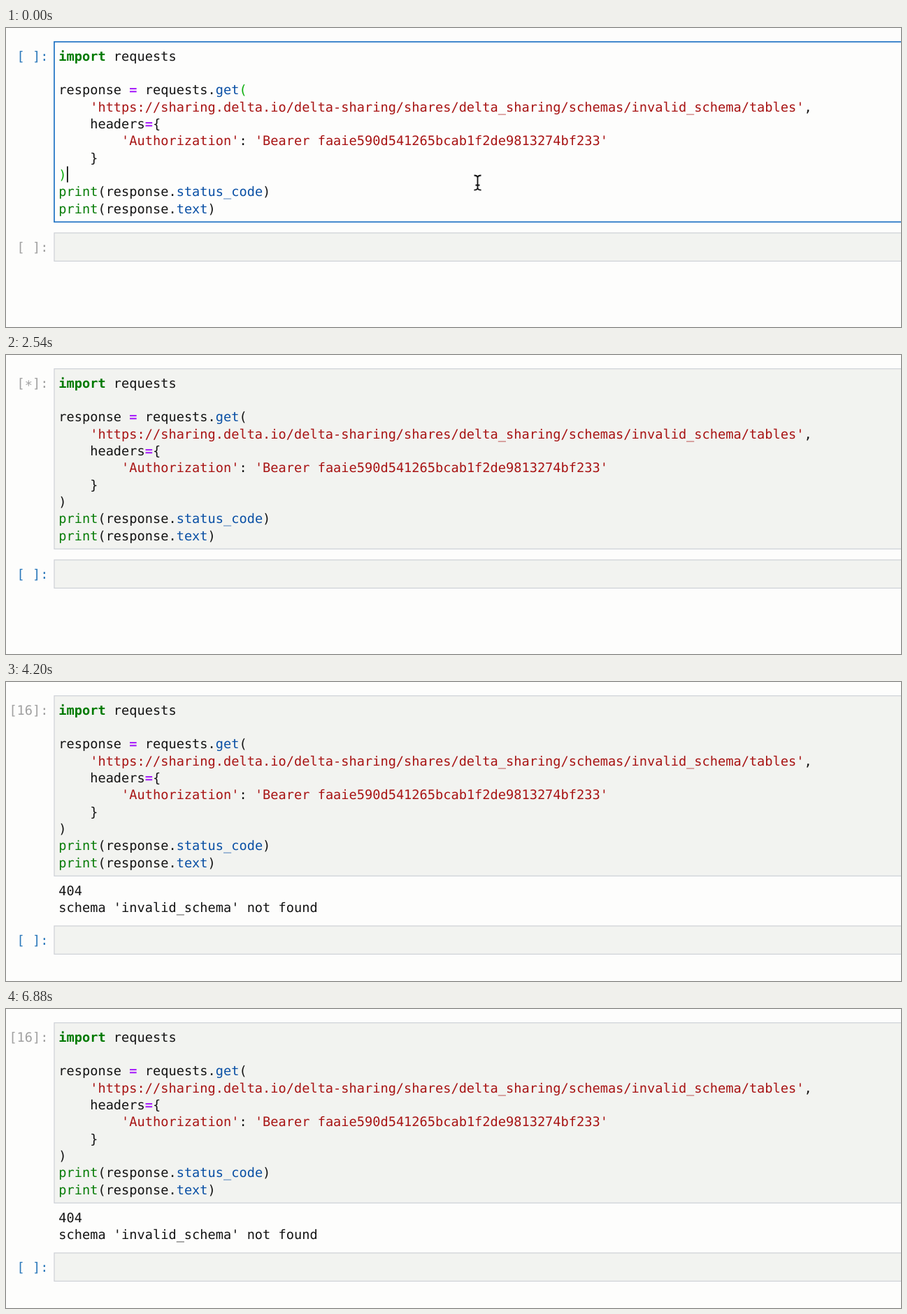
Recreate the animation shown at these times as an HTML page. Size 1280 by 429 pixels, loop 6.9 s.

```html
<!DOCTYPE html>
<html lang="en">
<head>
<meta charset="utf-8">
<title>Notebook cell run</title>
<style>
  html, body { margin: 0; width: 100%; height: 100%; overflow: hidden; background: #fdfdfc; }
  svg { display: block; width: 1280px; height: 429px; }
  text { font: 18.65px "DejaVu Sans Mono", monospace; fill: #141414; white-space: pre; text-rendering: geometricPrecision; }
  .kw { fill: #007a00; font-weight: bold; }
  .fn { fill: #087d08; }
  .op { fill: #a822fa; font-weight: bold; }
  .prop { fill: #0a50a5; }
  .str { fill: #a81414; }
  .cell { fill: #f2f3f0; stroke: #cdd0d6; stroke-width: 1.2; }
  .prompt { fill: #a0a0a0; text-anchor: end; }
  .active .cell { fill: #fdfdfc; stroke: #1f72c4; stroke-width: 1.7; }
  .active .prompt, .selected .prompt { fill: #2b78ba; }
  .active .match { fill: #0cae0c; }
</style>
</head>
<body>
<svg viewBox="0 0 1280 429">
  <g id="first">
    <rect class="cell" x="69" y="19.8" width="1230" height="258.5"/>
    <text class="prompt" id="count" x="60.5" y="46.8"></text>
    <g id="code"></g>
  </g>
  <g id="output">
    <text x="75.3" y="305.5">404</text>
    <text x="75.3" y="329.8">schema 'invalid_schema' not found</text>
  </g>
  <g id="second">
    <rect class="cell" x="69" y="294" width="1230" height="40.5"/>
    <text class="prompt" x="60.5" y="320.7">[ ]:</text>
  </g>
  <rect id="caret" x="87" y="198.5" width="1.8" height="23" fill="#111"/>
  <g id="pointer" fill="none">
    <path id="beam" d="M669.5 211.5Q674.5 211.5 674.5 215Q674.5 211.5 679.5 211.5M674.5 215V229M669.5 232.5Q674.5 232.5 674.5 229Q674.5 232.5 679.5 232.5M671.5 225.5H677.5" stroke="#111" stroke-width="1.8"/>
  </g>
</svg>
<script>
const $ = id => document.getElementById(id);
const span = (kind, s) => `<tspan class="${kind}">${s}</tspan>`;
const print = name => span('fn', 'print') + '(response.' + span('prop', name) + ')';

const lines = [
  span('kw', 'import') + ' requests',
  '',
  'response ' + span('op', '=') + ' requests.' + span('prop', 'get') + span('match', '('),
  '    ' + span('str', "'https://sharing.delta.io/delta-sharing/shares/delta_sharing/schemas/invalid_schema/tables'") + ',',
  '    headers' + span('op', '=') + '{',
  '        ' + span('str', "'Authorization'") + ': ' + span('str', "'Bearer faaie590d541265bcab1f2de9813274bf233'"),
  '    }',
  span('match', ')'),
  print('status_code'),
  print('text')
];
$('code').innerHTML = lines.map((s, i) =>
  `<text x="75.3" y="${46.8 + 24.33 * i}">${s}</text>`).join('');

const LOOP = 6900, RUN = 1400, DONE = 2640, HIDE_POINTER = 1340;
const BLINK = 530, BLINK_SHIFT = 370;
const prompts = {
  idle: '[ ]:',
  busy: '[<tspan dy="3.5">*</tspan><tspan dy="-3.5">]:</tspan>',
  done: '[16]:'
};
const show = (id, on) => $(id).setAttribute('visibility', on ? 'visible' : 'hidden');
let state;

function setState(next) {
  if (next === state) return;
  state = next;
  const idle = state === 'idle', done = state === 'done';
  $('count').innerHTML = prompts[state];
  $('first').setAttribute('class', idle ? 'active' : '');
  $('second').setAttribute('class', idle ? '' : 'selected');
  $('second').setAttribute('transform', `translate(0 ${done ? 56 : 0})`);
  show('output', done);
}

const start = performance.now();
function draw() {
  const t = (performance.now() - start) % LOOP;
  setState(t < RUN ? 'idle' : t < DONE ? 'busy' : 'done');
  show('caret', t < RUN && Math.floor((t + BLINK_SHIFT) / BLINK) % 2 === 0);
  show('pointer', t < HIDE_POINTER);
  requestAnimationFrame(draw);
}
draw();
</script>
</body>
</html>
```
